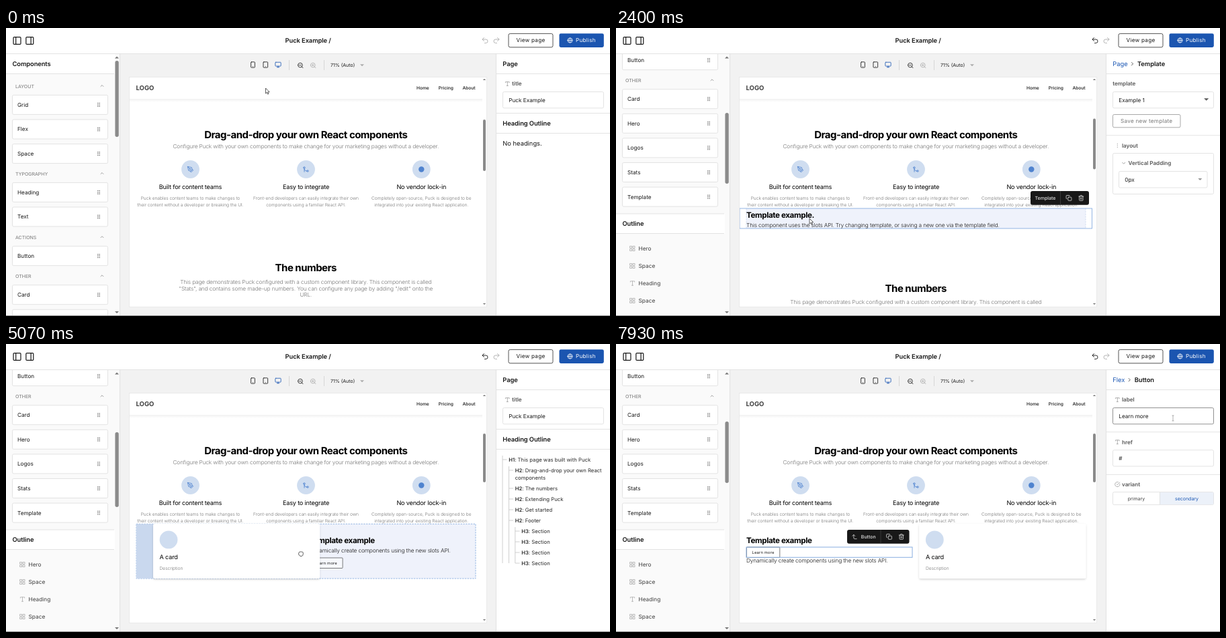
An HTML page for the animation above (8000 ms loop, 899 by 431 pixels).

```html
<!DOCTYPE html>
<html lang="en">
<head>
<meta charset="utf-8">
<title>Page editor</title>
<style>
html, body { margin: 0; width: 100%; height: 100%; overflow: hidden; background: #fff; }
svg { display: block; width: 100vw; height: 100vh; }
text { font-family: Inter, sans-serif; font-variation-settings: "opsz" 14; text-rendering: geometricPrecision; white-space: pre; }
.b { font-weight: 600; letter-spacing: -.008em; }
.m { font-weight: 500; }
.logo { font-weight: 700; }
.btn { letter-spacing: .03em; }
.h { font-weight: 700; letter-spacing: -.033em; }
.sub { font-weight: 300; letter-spacing: -.017em; }
.small { font-weight: 300; letter-spacing: -.006em; }
.card { letter-spacing: -.02em; }
.mid { text-anchor: middle; }
</style>
</head>
<body>
<svg id="stage" viewBox="0 0 899 431" preserveAspectRatio="none">
  <defs>
    <clipPath id="sideClip"><rect x="0" y="39" width="162" height="391"/></clipPath>
    <clipPath id="pageClip"><rect x="184" y="74" width="525" height="343"/></clipPath>
    <linearGradient id="fade" x1="0" y1="0" x2="0" y2="1">
      <stop offset="0" stop-color="#f1f1f1"/><stop offset="1" stop-color="#fff"/>
    </linearGradient>
    <filter id="shadow" x="-10%" y="-20%" width="120%" height="150%">
      <feDropShadow dx="0" dy="1.5" stdDeviation="1.6" flood-opacity=".16"/>
    </filter>
  </defs>
  <g id="frame"></g>
  <g clip-path="url(#sideClip)"><g id="side"></g></g>
  <g clip-path="url(#pageClip)"><g id="page"></g><g id="live"></g></g>
  <g id="panel"></g>
  <g id="over"></g>
</svg>
<script>
const INK = '#181818', GREY = '#767676', LINE = '#dcdcdc', BLUE = '#1d58b4';
const ZONE = '#eff2fb', SLOT = '#c9d8ee', EDGE = '#88aee0', DISC = '#cfddf0';
const DASH = 'stroke-dasharray="2.4 1.4"';
const $ = id => document.getElementById(id);

// drawing helpers
const text = (x, y, s, size = 8.19, fill = INK, cls = '') =>
  `<text x="${x}" y="${y + size * .36}" font-size="${size}" fill="${fill}" class="${cls}">${s}</text>`;
const rect = (x, y, w, h, fill, extra = '') =>
  `<rect x="${x}" y="${y}" width="${w}" height="${h}" fill="${fill}" ${extra}/>`;
const box = (x, y, w, h, stroke = LINE, fill = '#fff', r = 2) =>
  rect(x, y, w, h, fill, `stroke="${stroke}" stroke-width=".8" rx="${r}"`);
const dashed = (x, y, w, h, fill = 'none') => rect(x, y, w, h, fill, `stroke="${EDGE}" stroke-width=".9" ${DASH}`);
const path = (d, stroke = LINE, w = .8, extra = '') =>
  `<path d="${d}" fill="none" stroke="${stroke}" stroke-width="${w}" ${extra}/>`;
const disc = (x, y, r, fill) => `<circle cx="${x}" cy="${y}" r="${r}" fill="${fill}"/>`;
const tri = (x, y, dir = 1, fill = GREY, w = 3) =>
  `<path d="M${x - w} ${y - dir * w / 2}h${2 * w}l${-w} ${dir * w}z" fill="${fill}"/>`;

const round = (x, y, w, h) => `M${x + 2} ${y}h${w - 4}a2 2 0 0 1 2 2v${h - 4}a2 2 0 0 1-2 2h${4 - w}a2 2 0 0 1-2-2v${4 - h}a2 2 0 0 1 2-2z`;
const ring = (x, y, r) => `M${x - r} ${y}a${r} ${r} 0 1 0 ${2 * r} 0a${r} ${r} 0 1 0 ${-2 * r} 0z`;
const LENS = ring(11, 11, 8) + 'M21 21l-4.3-4.3M8 11h6';
const ICONS = {
  left: round(3, 3, 18, 18) + 'M9 3v18',
  right: round(3, 3, 18, 18) + 'M15 3v18',
  undo: 'M9 14L4 9l5-5M4 9h10.5a5.5 5.5 0 0 1 0 11H11',
  redo: 'M15 14l5-5-5-5M20 9H9.5a5.5 5.5 0 0 0 0 11H13',
  globe: ring(12, 12, 10) + 'M2 12h20M12 2a15 15 0 0 1 0 20a15 15 0 0 1 0-20',
  phone: round(5, 2, 14, 20) + 'M12 18h.01',
  tablet: round(4, 2, 16, 20) + 'M12 18h.01',
  monitor: round(2, 3, 20, 14) + 'M8 21h8M12 17v4',
  zoomOut: LENS,
  zoomIn: LENS + 'M11 8v6',
  type: 'M4 7V4h16v3M9 20h6M12 4v16',
  grid: 'M3 3h7v7h-7zM14 3h7v7h-7zM3 14h7v7h-7zM14 14h7v7h-7z',
  pen: 'M12 19l7-7 3 3-7 7zM18 13l-1.5-7.5L2 2l3.5 14.5L13 18zM2 2l7.6 7.6' + ring(11, 11, 2),
  merge: ring(18, 18, 3) + ring(6, 6, 3) + 'M6 21V9a9 9 0 0 0 9 9',
  copy: round(9, 9, 13, 13) + 'M5 15H4a2 2 0 0 1-2-2V4a2 2 0 0 1 2-2h9a2 2 0 0 1 2 2v1',
  trash: 'M3 6h18M19 6v14a2 2 0 0 1-2 2H7a2 2 0 0 1-2-2V6M8 6V4a2 2 0 0 1 2-2h4a2 2 0 0 1 2 2v2M10 11v6M14 11v6',
  check: 'M22 11v1a10 10 0 1 1-6-9.1M22 4L12 14l-3-3',
  up: 'M18 15l-6-6-6 6', down: 'M6 9l6 6 6-6', next: 'M9 18l6-6-6-6',
  parent: 'M14 9L9 4 4 9M20 20h-7a4 4 0 0 1-4-4V4',
  dots: 'M12 5h.01M12 12h.01M12 19h.01'
};
const icon = (name, x, y, size, color = INK, w = 2) =>
  `<path transform="translate(${x - size / 2} ${y - size / 2}) scale(${size / 24})" d="${ICONS[name]}" fill="none" stroke="${color}" stroke-width="${w}" stroke-linecap="round" stroke-linejoin="round"/>`;
const handle = (x, y, k = 1) => {
  let s = '';
  for (let i = 0; i < 6; i++) s += disc(x + (i % 2 ? 1.2 : -1.2) * k, y + ((i >> 1) - 1) * 2.3 * k, .75 * k, '#666');
  return s;
};

// sidebar
const item = (x, y, name) => box(x, y - 14.5, 142, 29) + text(x + 7.5, y, name) + handle(x + 128.5, y);
function sidebar() {
  let s = rect(0, 38, 162, 30.5, '#fff') + path('M0 68.5H161') + text(9.5, 53.5, 'Components', 9.36, INK, 'b');
  const groups = [['LAYOUT', 87.5, 'Grid Flex Space'], ['TYPOGRAPHY', 218.5, 'Heading Text'],
    ['ACTIONS', 313.7, 'Button'], ['OTHER', 371.8, 'Card Hero Logos Stats Template']];
  for (const [title, y, names] of groups) {
    s += text(14, y, title, 7.02, GREY) + icon('up', 143, y - 1, 8, GREY);
    names.split(' ').forEach((n, i) => s += item(9.5, y + 27.4 + i * 36.6, n));
  }
  s += rect(0, 571, 162, 30, '#fff') + path('M0 571H161M0 600.5H161') + text(9.5, 585.5, 'Outline', 9.36, INK, 'b');
  ['Hero', 'Space', 'Heading', 'Space', 'Hero'].forEach((n, i) => {
    const y = 623 + i * 26;
    s += icon(n === 'Heading' ? 'type' : 'grid', 24.5, y, 9.4, '#ababab') + text(33.5, y, n, 8.3, '#404040');
  });
  return s;
}

// fixed window parts
function windowFrame() {
  return rect(0, 0, 899, 431, '#fff') + rect(0, 39, 169, 392, '#fafafa') + rect(169.5, 39, 560, 392, '#f2f2f2') +
    path('M0 38.5H899M169.5 38.5V431M729.5 38.5V431') +
    icon('left', 16.5, 19, 14.6) + icon('right', 35.3, 19, 14.6) +
    text(449.7, 18.5, 'Puck Example /', 9.36, INK, 'b mid') +
    icon('redo', 730, 18.5, 12, '#b4b4b4') +
    box(748, 8.4, 66, 20.4, '#292929', '#fff', 2.4) + text(781, 18.5, 'View page', 8.19, INK, 'mid btn') +
    rect(823.5, 8.2, 66.3, 20.7, '#1b55b0', 'rx="2.4"') + icon('globe', 839.5, 18.5, 8.6, '#fff') +
    text(848, 18.5, 'Publish', 8.19, '#fff', 'btn') +
    icon('phone', 367.5, 55, 10) + icon('tablet', 386.3, 55, 10) + icon('monitor', 405, 55, 10, BLUE) +
    path('M421.5 48V63M473.5 48V63', '#cfcfcf') +
    icon('zoomOut', 438.3, 56, 10) + icon('zoomIn', 457.2, 56, 10, '#ababab') +
    text(483, 55.7, '71% (Auto)', 7.02) + tri(530, 55.8, 1, '#ababab') +
    rect(183.5, 73.5, 532, 344, '#fff', 'stroke="#e4e4e4" stroke-width=".7"') +
    tri(712, 77, -1, GREY, 2.2) + tri(712, 413, 1, GREY, 2.2) +
    tri(165, 44, -1) + tri(165, 425.5, 1) +
    rect(0, 430, 899, 1, '#8f8f8f');
}

function features() {
  const cols = [
    [274.5, 'Built for content teams', 'Puck enables content teams to make changes to', 'their content without a developer or breaking the UI.', 'pen'],
    [446.5, 'Easy to integrate', 'Front-end developers can easily integrate their own', 'components using a familiar React API.', 'merge'],
    [618.3, 'No vendor lock-in', 'Completely open-source, Puck is designed to be', 'integrated into your existing React application.']];
  let s = rect(184, 106, 525, 5, 'url(#fade)') + text(193.5, 90, 'LOGO', 9.5, '#404040', 'logo') +
    [[611, 'Home'], [643.7, 'Pricing'], [679.4, 'About']].map(([x, n]) => text(x, 89.8, n, 6.65, '#333', 'b')).join('') +
    text(446.3, 160, 'Drag-and-drop your own React components', 14.96, '#000', 'h mid') +
    text(446.3, 177.5, 'Configure Puck with your own components to make change for your marketing pages without a developer.', 8.31, GREY, 'sub mid');
  for (const [x, title, a, b, ic] of cols) {
    s += disc(x, 211.5, 13.4, DISC) + (ic ? icon(ic, x, 211.5, 10, '#4f83cf') : disc(x, 211.5, 4.2, '#4f83cf')) +
      text(x, 238, title, 9.14, '#000', 'card mid') +
      text(x, 254.7, a, 6.65, GREY, 'small mid') + text(x, 264.9, b, 6.65, GREY, 'small mid');
  }
  return s;
}

function numbers(dy) {
  const lines = ['This page demonstrates Puck configured with a custom component library. This component is called',
    '"Stats", and contains some made-up numbers. You can configure any page by adding "/edit" onto the', 'URL.'];
  return text(446.3, 359 + dy, 'The numbers', 14.96, '#000', 'h mid') +
    lines.map((l, i) => text(446.3, 380 + dy + i * 9.6, l, 8.31, GREY, 'sub mid')).join('');
}

// right panel
const rule = y => path(`M730 ${y}H899`);
const field = (y, value, stroke = LINE, fill = '#fff') => box(739.5, y, 150, 24.3, stroke, fill) + text(748.3, y + 12.2, value);
const label = (y, name, ic, w) => (ic ? icon(ic, 746.3, y, 8.6, '#949494', w) : '') +
  text(ic ? 753 : 739.3, y, name, 8.19, '#5a5a5a', 'b');
const crumbs = (a, x, b) => text(739.3, 53.5, a, 9.36, BLUE) + icon('next', x, 53.7, 8.6) +
  text(x + 7.5, 53.5, b, 9.36, INK, 'b') + rule(68.5);

function pagePanel(listed) {
  let s = text(739.3, 53.5, 'Page', 9.36, INK, 'b') + rule(68.5) + label(83.5, 'title', 'type') + field(95.5, 'Puck Example') +
    rule(127.5) + text(739.3, 142.5, 'Heading Outline', 9.36, INK, 'b') + rule(157.5);
  if (!listed) return s + text(739.3, 173, 'No headings.', 9.36);
  const rows = [[1, 'This page was built with Puck'], [2, 'Drag-and-drop your own React'], [2, 'The numbers'], [2, 'Extending Puck'],
    [2, 'Get started'], [2, 'Footer'], [3, 'Section'], [3, 'Section'], [3, 'Section'], [3, 'Section']];
  s += path('M739 167V328M748.5 183V328M757.8 274V328', '#c3c3c3');
  rows.forEach(([n, name], i) => {
    const y = 173.5 + i * 16 + (i > 1 ? 11 : 0), x = 738.7 + n * 9.5;
    s += path(`M${x - 9.2} ${y - .5}h6.5`, '#c3c3c3') +
      text(x, y, `<tspan font-weight="600">H${n}</tspan>: ${name}`, 7.73, '#292929');
  });
  return s + text(757.7, 200.5, 'components', 7.73, '#292929');
}

function templatePanel(choice, hover) {
  return crumbs('Page', 768.5, 'Template') + label(83.5, 'template') +
    field(95.5, choice, hover ? '#858585' : LINE, hover ? '#f3f6fb' : '#fff') + tri(878.7, 107, 1, '#5a5a5a', 3.6) +
    box(739.5, 129.5, 100.5, 19.3, '#949494') + text(789.7, 139.2, 'Save new template', 8.19, GREY, 'mid btn') +
    rule(160.7) + label(175.8, 'layout', 'dots', 3.4) + box(739.5, 187.5, 150, 61) +
    icon('down', 755.7, 202.3, 8, GREY) + text(762.5, 202.3, 'Vertical Padding', 8.19, '#5a5a5a', 'b') +
    box(748.5, 214.5, 131.5, 24.5) + text(757.3, 226.8, '0px') + tri(869.3, 226.6, 1, '#949494');
}

function buttonPanel(hover) {
  return crumbs('Flex', 764.2, 'Button') + label(83.5, 'label', 'type') + field(95.5, 'Learn more', hover ? GREY : LINE) +
    rule(131.7) + label(146.7, 'href', 'type') + field(158.7, '#') + rule(195.4) + label(210, 'variant', 'check') +
    box(739.5, 221.6, 150, 19) + rect(809.5, 222, 79.7, 18.2, '#ecf1f9') + path('M809.5 222V240.3') +
    text(774.5, 231.2, 'primary', 7.02, '#404040', 'mid') + text(849.5, 231.2, 'secondary', 7.02, BLUE, 'mid');
}

// blocks on the page
const bar = (x, y, w, name, tx) => rect(x, y, w, 20.7, INK, 'rx="3"') + text(tx, y + 10.4, name, 7.02, '#e4e4e4', 'm') +
  path(`M${x + w - 42.5} ${y}v20.7`, '#404040') +
  icon('copy', x + w - 30, y + 10.4, 9.4, LINE) + icon('trash', x + w - 11.7, y + 10.4, 9.4, LINE);
const selection = (y, h) => rect(194, y, 505, h, ZONE) + path(`M699 ${y}v${h}M194 ${y}v${h}`, '#bccfea', .6, DASH) +
  rect(184, y, 524.5, h, 'none', `stroke="${EDGE}" stroke-width=".9"`);
const card = (x, y) => rect(x, y, 248, 82, '#fff', 'rx="2.5" filter="url(#shadow)"') + disc(x + 23, y + 24, 13.4, DISC) +
  text(x + 9.6, y + 50, 'A card', 9.14, '#000', 'card') + text(x + 9.6, y + 67, 'Description', 6.65, GREY, 'small');
const caption = (x, y) => text(x + 25, y + 7.8, 'Learn more', 5.82, INK, 'btn mid');
const learn = (x, y, fill = '#fff') => box(x + .4, y, 49.4, 15.5, '#5a5a5a', fill, 1) + caption(x, y);
const intro = (x, paraY) => text(x, 294, 'Template example', 11.64, '#000', 'h') +
  text(x, paraY, 'Dynamically create components using the new slots API.', 8.31, INK, 'sub');

// timing
const smooth = u => (u = Math.max(0, Math.min(1, u)), u * u * (3 - 2 * u));
const mix = (a, b, u) => a + (b - a) * u;
const during = (t, a, b) => t >= a && t < b;
const STOPS = [[0, 386.5, 90], [450, 90, 250], [850, 90, 250], [1150, 70, 257], [1250, 70, 257], [1780, 288, 285], [2600, 288, 285],
  [3150, 802, 119], [3500, 802, 119], [3800, 790, 132], [4250, 790, 132], [4780, 414, 311.5], [4911, 414, 311.5], [5500, 552, 325],
  [5780, 552, 325], [6190, 235, 326], [6410, 235, 326], [7070, 239, 316], [7200, 237, 309], [7450, 237, 309], [7850, 829, 111], [8000, 829, 111]];
function pointerAt(t) {
  const i = Math.max(1, STOPS.findIndex(s => s[0] > t)), a = STOPS[i - 1], b = STOPS[i];
  const u = smooth((t - a[0]) / (b[0] - a[0]));
  return [mix(a[1], b[1], u), mix(a[2], b[2], u)];
}
const GRAB = 1250, DROP = 2400, SWITCH = 3900, LIFT = 4920, CARD_DROP = 5510, CARD_DONE = 5780;
const PICK = 6420, REORDER = 7190, PUT = 7250, PUT_DONE = 7430;

function blocks(t, x, y) {
  if (t < DROP) {
    if (t < GRAB || x < 184) return numbers(0);
    const u = smooth((t - 2250) / 150), gx = mix(x - 224, 184, u), gy = mix(y - 13, 270, u);
    return numbers(21) + path('M184.5 111V417M708.5 111V417', EDGE, .9, DASH) + rect(184, 269.5, 525, 21, SLOT) +
      rect(gx, gy, 525, 19.5, '#fff', 'filter="url(#shadow)"') + handle(gx + 515.5, gy + 10, .72);
  }
  if (t < SWITCH) return numbers(30.5) + selection(270, 30) + text(194, 280.3, 'Template example.', 11.64, '#000', 'h') +
    text(194, 295.3, 'This component uses the slots API. Try changing template, or saving a new one via the template field.', 8.31, INK, 'sub') +
    bar(617, 244, 87, 'Template', 623.5);
  const swapped = t >= 5280, col = swapped ? 194 : 451.3;
  if (t < LIFT) return selection(269, 82) + card(194, 269) + intro(col, 309) + learn(col, 320) + bar(617, 244, 87, 'Template', 623.5);
  if (t < CARD_DONE) {
    const u = smooth((t - CARD_DROP) / 250);
    return dashed(194, 269.3, 505, 81.7, ZONE) + rect(swapped ? 451.3 : 194, 269.5, 247.5, 81.3, SLOT) +
      intro(col, 309) + learn(col, 320, '#f6f8fd') + card(mix(x - 220, 451.3, u), mix(y - 45, 269, u));
  }
  const fixed = card(451.3, 269);
  if (t < PICK) return fixed + intro(194, 309) + learn(194, 320);
  if (t < PUT_DONE) {
    const up = t >= REORDER, u = smooth((t - PUT) / 180), gx = mix(x - 41, 194, u), gy = mix(y - 6, 304, u);
    return fixed + dashed(194, 269.3, 247.5, 81.7, ZONE) + rect(194, up ? 304 : 320, 247.5, 15.5, SLOT) + intro(194, up ? 324.5 : 309) +
      rect(gx, gy, 247.5, 15.5, 'none', 'stroke="#d5dff0" stroke-width=".7"') +
      path(`M${gx + 49.7} ${gy}v15.5`, '#5a5a5a') + caption(gx, gy);
  }
  return fixed + intro(194, 324.5) + learn(194, 304) + rect(194, 304, 247, 15.3, 'none', `stroke="${EDGE}"`) +
    bar(344, 278, 92.5, 'Button', 364.8) + icon('parent', 355, 288.5, 9.4, LINE);
}

const FIST = 'M-2.8-2.2q1-1.5 2-.5q1-1 2 0q1.8-.5 2 1v2.2q0 2.5-2 3h-2.2q-2.2-1-2.5-3.3z';
const HAND = 'M-2-4.5q1-1 1.8 0v3.3l3 .7q1 .4 .8 1.6l-.6 3.6h-4.2l-2.5-3.5q.3-1 1.7 0z';
const ARROW = 'M0 0v8l1.9-1.7 1.2 2.8 1.3-.6-1.2-2.7h2.5z';
function pointer(t, x, y) {
  if (t > 7750) return path(`M${x - 1.5} ${y - 4}h3M${x} ${y - 4}v8M${x - 1.5} ${y + 4}h3`, '#8f8f8f', .7);
  const fist = during(t, 1220, DROP) || during(t, LIFT, CARD_DROP) || during(t, PICK, PUT);
  const hand = during(t, 350, 1220) || during(t, 3080, 4300) || during(t, 4700, 7500);
  return `<path transform="translate(${x} ${y})" d="${fist ? FIST : hand ? HAND : ARROW}" fill="#fff" stroke="#333" stroke-width=".8" stroke-linejoin="round"/>`;
}

const thumb = (x, w, top, end) => rect(x, top, w, end - top, '#8b8b8b', `rx="${w / 2}"`);

function render(t) {
  const [x, y] = pointerAt(t), scroll = smooth((t - 430) / 420);
  $('side').setAttribute('transform', `translate(0 ${-293 * scroll})`);
  $('live').innerHTML = blocks(t, x, y);

  const templated = during(t, DROP, LIFT), buttoned = t >= PUT_DONE;
  $('panel').innerHTML = templated ? templatePanel(t < SWITCH ? 'Example 1' : 'Example 2', during(t, 3050, 4300))
    : buttoned ? buttonPanel(t > 7750) : pagePanel(t >= DROP);

  const dragging = during(t, GRAB, DROP);
  const side = t < DROP ? [49 + 84 * scroll, 163 + 84 * scroll] : templated ? [127, 233] : buttoned ? [116, 208] : [132, 244];
  const view = t >= SWITCH ? [134, 207] : t >= DROP ? [135.5, 211.5] : dragging && x >= 184 ? [136, 212.5] : [137, 214];
  $('over').innerHTML = thumb(162.4, 5.4, ...side) + thumb(710, 4, ...view) +
    icon('undo', 713, 18.5, 12, t < DROP ? '#b4b4b4' : '#292929') +
    (dragging && x < 184 ? item(x - 60.5, y - 4, 'Template') : '') + pointer(t, x, y);
}

$('frame').innerHTML = windowFrame();
$('side').innerHTML = sidebar();
$('page').innerHTML = features();
const start = performance.now();
(function tick() {
  render((performance.now() - start) % 8000);
  requestAnimationFrame(tick);
})();
</script>
</body>
</html>
```
